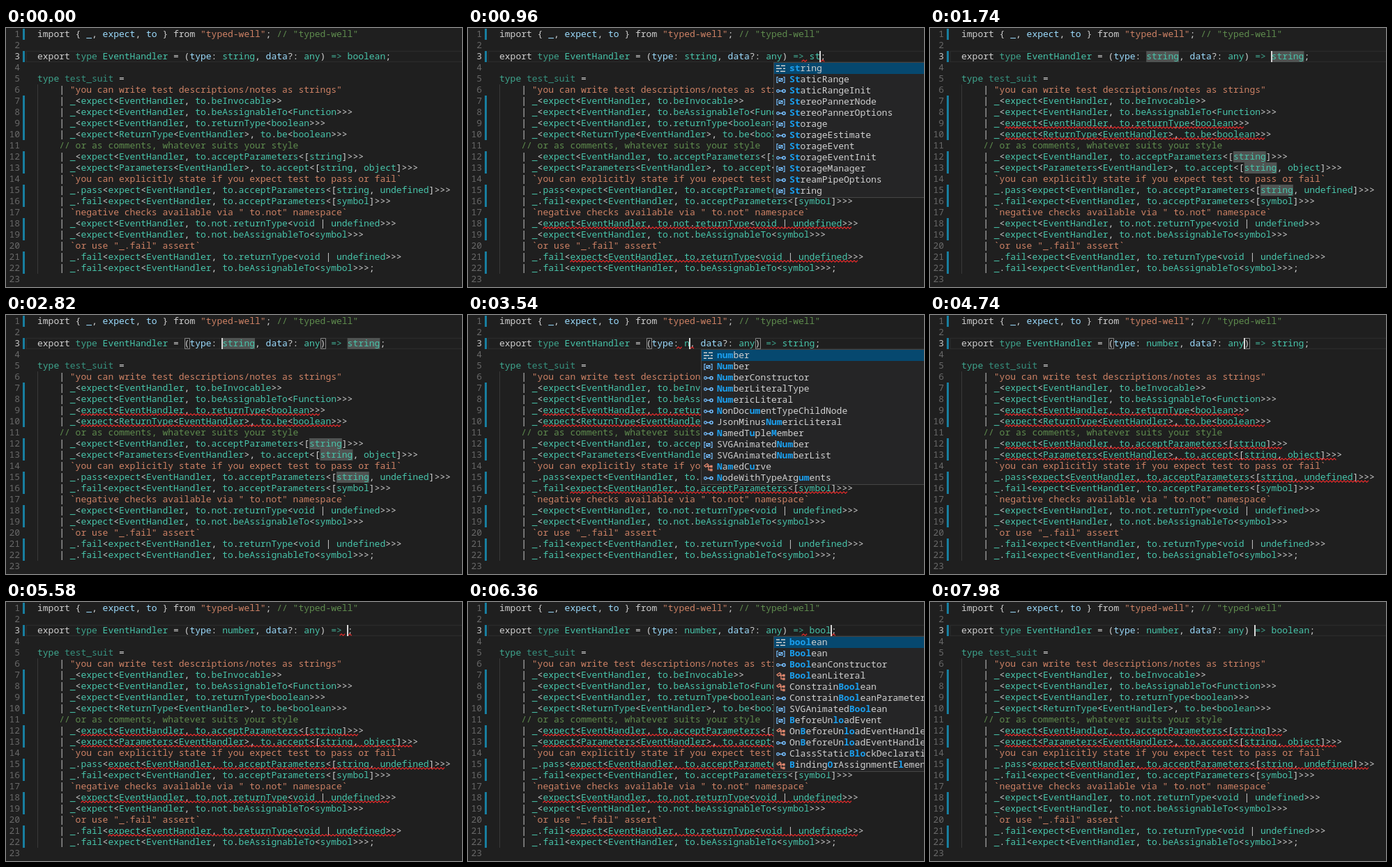
Write an HTML page with a canvas that moves like this. It is 654x372 px and loops after 8000 ms.

```html
<!DOCTYPE html>
<html lang="en">
<head>
<meta charset="utf-8">
<title>Type tests in an editor</title>
<style>
  html, body { margin: 0; width: 100%; height: 100%; overflow: hidden; background: #1f1f1f; }
  canvas { display: block; }
</style>
</head>
<body>
<canvas id="stage" width="654" height="372"></canvas>
<script>
const ctx = document.getElementById('stage').getContext('2d');
const W = 654, H = 372, LOOP = 8000, ROW = 16, LEFT = 45;
const FONT = "13px 'Noto Sans Mono', 'DejaVu Sans Mono', monospace";
const PARAM_COL = 34;

const C = {
  bg: '#1f1f1f', plain: '#d0d0d0', type: '#48c5ab', keyword: '#3fa78f', faded: '#36907e',
  variable: '#9cdcfe', string: '#ce8265', comment: '#5f8c4e', number: '#686868',
  error: '#e02a2a', gutter: '#187e9f', match: '#1a9fef'
};

const codeLines = (param, ret) => [
  'import { _, expect, to } from "typed-well"; // "typed-well"',
  '',
  `export type EventHandler = (type: ${param}, data?: any) => ${ret};`,
  '',
  'type test_suit =',
  '    | "you can write test descriptions/notes as strings"',
  '    | _<expect<EventHandler, to.beInvocable>>',
  '    | _<expect<EventHandler, to.beAssignableTo<Function>>>',
  '    | _<expect<EventHandler, to.returnType<boolean>>>',
  '    | _<expect<ReturnType<EventHandler>, to.be<boolean>>>',
  '    // or as comments, whatever suits your style',
  '    | _<expect<EventHandler, to.acceptParameters<[string]>>>',
  '    | _<expect<Parameters<EventHandler>, to.accept<[string, object]>>>',
  '    | `you can explicitly state if you expect test to pass or fail`',
  '    | _.pass<expect<EventHandler, to.acceptParameters<[string, undefined]>>>',
  '    | _.fail<expect<EventHandler, to.acceptParameters<[symbol]>>>',
  '    | `negative checks available via " to.not" namespace`',
  '    | _<expect<EventHandler, to.not.returnType<void | undefined>>>',
  '    | _<expect<EventHandler, to.not.beAssignableTo<symbol>>>',
  '    | `or use "_.fail" assert`',
  '    | _.fail<expect<EventHandler, to.returnType<void | undefined>>>',
  '    | _.fail<expect<EventHandler, to.beAssignableTo<symbol>>>;',
  ''
];
const changedRanges = [[1, 1], [3, 3], [7, 10], [12, 13], [15, 16], [18, 19], [21, 22]];

// Icon letter (keyword, variable, interface, class), then the name with its matches in brackets.
const popups = {
  string: { x: 438, items: ['k[st]ring', 'v[St]aticRange', 'i[St]aticRangeInit', 'v[St]ereoPannerNode',
    'i[St]ereoPannerOptions', 'v[St]orage', 'i[St]orageEstimate', 'v[St]orageEvent',
    'i[St]orageEventInit', 'v[St]orageManager', 'i[St]reamPipeOptions', 'v[St]ring'] },
  number: { x: 334, items: ['k[num]ber', 'v[Num]ber', 'i[Num]berConstructor', 'i[Num]berLiteralType',
    'i[Num]ericLiteral', 'i[N]onDoc[um]entTypeChildNode', 'iJsonMinus[Num]ericLiteral',
    'i[N]amedT[u]ple[M]ember', 'vSVGAnimated[Num]ber', 'vSVGAnimated[Num]berList',
    'c[N]a[m]edC[u]rve', 'i[N]odeWithTypeArg[um]ents'] },
  boolean: { x: 438, items: ['k[bool]ean', 'v[Bool]ean', 'i[Bool]eanConstructor', 'c[Bool]eanLiteral',
    'cConstrain[Bool]ean', 'iConstrain[Bool]eanParameters', 'vSVGAnimated[Bool]ean',
    'v[B]eforeUn[lo]adEvent', 'cOn[B]eforeUn[lo]adEventHandler', 'iOn[B]eforeUn[lo]adEventHandlerNonNull',
    'iClassStatic[Blo]ckDeclaration', 'c[B]inding[O]rAssignmentE[l]ement'] }
};

// time, parameter type, return type, caret column, open popup
const edits = [
  [-600, 'string', 'boolean', 54],
  [120, 'string', 'boolean', 57],
  [300, 'string', '', 57],
  [720, 'string', 's', 58, 'string'],
  [840, 'string', 'st', 59, 'string'],
  [1080, 'string', 'str', 60, 'string'],
  [1260, 'string', 'string', 63],
  ...[57, 54, 51, 49, 42, 40, 34].map((col, i) => [1740 + i * 120, 'string', 'string', col]),
  [3060, '', 'string', 34],
  [3540, 'n', 'string', 35, 'number'],
  [3720, 'nu', 'string', 36, 'number'],
  [3900, 'num', 'string', 37, 'number'],
  [4140, 'number', 'string', 40],
  ...[41, 46, 48, 52, 56, 57].map((col, i) => [4380 + i * 120, 'number', 'string', col]),
  [5100, 'number', '', 57],
  ...['b', 'bo', 'boo', 'bool'].map((s, i) => [5700 + i * 120, 'number', s, 58 + i, 'boolean']),
  [6480, 'number', 'boolean', 64],
  [7260, 'number', 'boolean', 57],
  [7620, 'number', 'boolean', 54]
];

// time, lines with errors, column of a missing type
const diagnostics = [
  [0, []],
  [540, [18, 21], 57],
  [1500, [9, 10]],
  [3300, [9, 10, 16], PARAM_COL],
  [4500, [9, 10, 12, 13, 15]],
  [5340, [12, 13, 15, 18, 21], 57],
  [6900, [12, 13, 15]]
];

// time, word whose occurrences are marked
const occurrences = [[0, ''], [1560, 'string'], [1860, ''], [2640, 'string'], [3060, '']];

const latest = (track, t) => track.findLast(entry => entry[0] <= t);
ctx.font = '300 ' + FONT;
const CHAR = ctx.measureText('m').width;
const colX = col => LEFT + col * CHAR;
const rowY = line => (line - 1) * ROW + 1;

function rect(x, y, w, h, color) {
  ctx.fillStyle = color;
  ctx.fillRect(x, y, w, h);
}

function text(s, x, y, color, weight = 300) {
  ctx.font = weight + ' ' + FONT;
  ctx.fillStyle = color;
  ctx.fillText(s, x, y);
}

function stroke(color, width, trace) {
  ctx.strokeStyle = color;
  ctx.lineWidth = width;
  ctx.beginPath();
  trace();
  ctx.stroke();
}

function squiggle(x1, x2, line) {
  const y = rowY(line) + 14;
  stroke(C.error, 1.2, () => {
    for (let x = x1, i = 0; x <= x2; x += 2.5, i++) ctx.lineTo(x, y + (i % 2 ? -1.2 : 1.2));
  });
}

function tokenColor(token, rest, line) {
  if (token.startsWith('//')) return C.comment;
  if (/^["`]/.test(token)) return C.string;
  if (/^(import|from|export)$/.test(token)) return C.plain;
  if (token === 'type' || token === 'data') return /^\??:/.test(rest) ? C.variable : C.keyword;
  if (token === '=>') return C.keyword;
  if (token === 'test_suit') return C.faded;
  if (/^\w/.test(token)) return line === 1 ? C.variable : C.type;
  return C.plain;
}

function drawCode(s, line) {
  for (const m of s.matchAll(/\/\/.*|"[^"]*"|`[^`]*`|\w+|=>|[^\w\s]/g)) {
    const rest = s.slice(m.index + m[0].length);
    text(m[0], colX(m.index), rowY(line) + 12, tokenColor(m[0], rest, line));
  }
}

function drawIcon(kind, x, y) {
  const blue = '#75beff', salmon = '#e58a70';
  if (kind === 'k') {
    [[0, 5, -5], [7, 6, -5], [0, 8, -1], [10, 3, -1], [0, 4, 3], [6, 7, 3]]
      .forEach(([dx, w, dy]) => rect(x + dx, y + dy, w, 1.5, C.plain));
  } else if (kind === 'v') {
    stroke(blue, 1.2, () => {
      ctx.moveTo(x + 3, y - 4); ctx.lineTo(x + 1, y - 4); ctx.lineTo(x + 1, y + 4); ctx.lineTo(x + 3, y + 4);
      ctx.moveTo(x + 10, y - 4); ctx.lineTo(x + 12, y - 4); ctx.lineTo(x + 12, y + 4); ctx.lineTo(x + 10, y + 4);
      ctx.rect(x + 4, y - 2, 5, 4);
      ctx.moveTo(x + 4, y + 2); ctx.lineTo(x + 9, y - 2);
    });
  } else if (kind === 'i') {
    stroke(blue, 1.3, () => {
      ctx.arc(x + 2.5, y, 1.8, 0, 7);
      ctx.moveTo(x + 4.5, y); ctx.lineTo(x + 9, y);
    });
    stroke(blue, 1.6, () => ctx.arc(x + 11, y, 2, 0, 7));
  } else {
    stroke(salmon, 1.3, () => {
      ctx.moveTo(x + 1, y - 2); ctx.lineTo(x + 5, y - 5); ctx.lineTo(x + 7, y - 3);
      ctx.lineTo(x + 3, y); ctx.closePath();
      ctx.moveTo(x + 5, y - 1); ctx.lineTo(x + 12, y - 1);
      ctx.moveTo(x + 7, y - 1); ctx.lineTo(x + 7, y + 4); ctx.lineTo(x + 10, y + 4);
      ctx.rect(x + 10, y - 2, 2, 2);
      ctx.rect(x + 10, y + 3, 2, 2);
    });
  }
}

function drawPopup({ x, items }) {
  const top = 49;
  rect(x, top, W - x, items.length * ROW + 3, '#454545');
  rect(x + 1, top + 1, W - x, items.length * ROW + 1, '#252526');
  rect(x + 1, top + 1, W - x, ROW, '#06486f');
  items.forEach((item, i) => {
    const y = top + 1 + i * ROW;
    drawIcon(item[0], x + 4, y + 8.5);
    let col = 0;
    item.slice(1).split(/[[\]]/).forEach((part, j) => {
      const matched = j % 2;
      text(part, x + 23 + col * CHAR, y + 12, matched ? C.match : C.plain, matched ? 700 : 300);
      col += part.length;
    });
  });
}

function draw(t) {
  const [editTime, param, ret, caret, popup] = latest(edits, t);
  const [, errorLines, missing] = latest(diagnostics, t);
  const word = latest(occurrences, t)[1];
  const lines = codeLines(param, ret);
  const closeCol = lines[2].indexOf(')');

  rect(0, 0, W, H, C.bg);
  stroke('#2a2a2a', 1.5, () => ctx.rect(29, rowY(3) + 0.5, W, ROW - 1));
  rect(LEFT, rowY(6), 1, 17 * ROW, '#393939');
  for (const [from, to] of changedRanges) rect(24, rowY(from), 3, (to - from + 1) * ROW, C.gutter);

  if (word) [3, 12, 13, 15].forEach(line => {
    for (const m of lines[line - 1].matchAll(new RegExp(`\\b${word}\\b`, 'g')))
      rect(colX(m.index), rowY(line), word.length * CHAR, ROW, '#505352');
  });

  if (caret >= 27 && caret <= closeCol + 1)
    for (const col of [27, closeCol])
      stroke('#858585', 1, () => ctx.rect(Math.round(colX(col)) + 0.5, rowY(3) + 0.5, 7, ROW - 1));

  lines.forEach((s, i) => {
    const label = String(i + 1);
    text(label, 20 - label.length * CHAR, rowY(i + 1) + 12, i === 2 ? '#c6c6c6' : C.number);
    drawCode(s, i + 1);
  });

  for (const line of errorLines) {
    const s = lines[line - 1];
    squiggle(colX(s.indexOf('expect')), colX(s.length - 1), line);
  }
  if (missing) {
    const end = missing + (missing === PARAM_COL ? param : ret).length;
    squiggle(colX(missing) - 11, colX(missing) - 3, 3);
    squiggle(colX(end) + 1, colX(end + 1), 3);
  }

  if ((t - editTime) % 1060 < 530) rect(Math.round(colX(caret)) - 1, rowY(3), 2, ROW, '#d6d6d6');
  if (popup) drawPopup(popups[popup]);
}

const start = performance.now();
function tick() {
  draw((performance.now() - start) % LOOP);
  requestAnimationFrame(tick);
}
tick();
</script>
</body>
</html>
```
